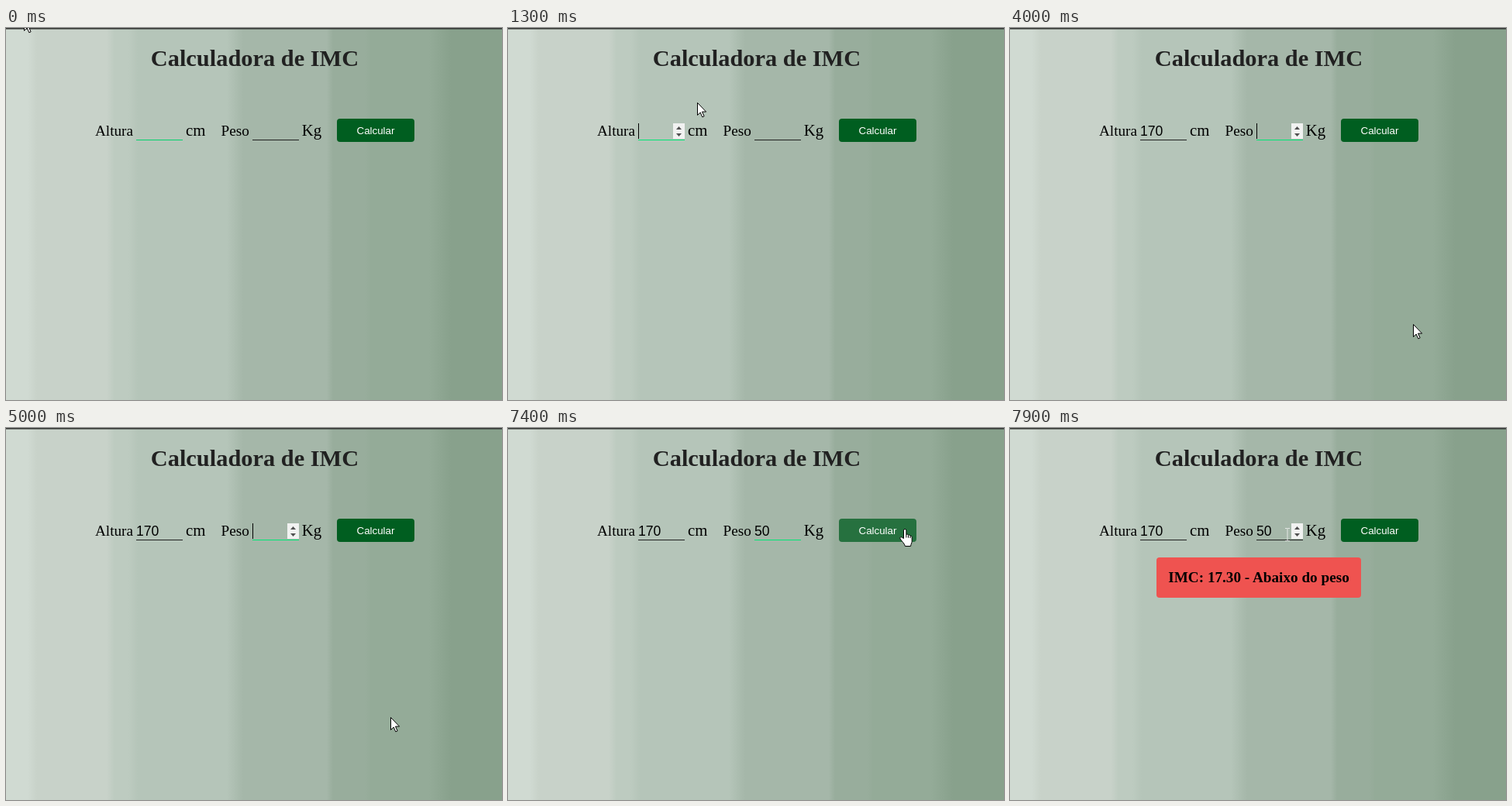
Animation of 640x480 px, one loop 8000 ms. Source, as an HTML page:

```html
<!DOCTYPE html>
<html lang="pt">
<head>
<meta charset="utf-8">
<title>Calculadora de IMC</title>
<style>
  html, body { margin: 0; width: 100%; height: 100%; overflow: hidden; }
  body {
    background: linear-gradient(90deg,
      #d0dad2 28px, #c8d2c9 40px 130px, #bdcbc0 140px 158px,
      #b5c5b9 170px 285px, #a5b7a9 306px 414px, #98ad9c 422px 464px,
      #94ab98 471px 546px, #88a18c 574px);
  }
  svg { display: block; width: 640px; height: 480px; }
  text { font-family: "Liberation Serif", "Times New Roman", serif; font-size: 19.2px; }
  .title { font-size: 30.4px; font-weight: bold; fill: #212121; }
  .unit { font-size: 20.8px; }
  .value, .label { font-family: "Liberation Sans", Arial, sans-serif; }
  .value { font-size: 17.6px; }
  .label { font-size: 13.333px; fill: #fff; }
  .result { font-weight: bold; }
</style>
</head>
<body>
<svg viewBox="0 0 640 480">
  <defs>
    <g id="spinner">
      <path fill="#f1f2f1" d="M45 123h15v20h-15z"/>
      <path fill="#505050" d="M49 131l3.5-4 3.5 4zM49 136h7l-3.5 4z"/>
    </g>
  </defs>
  <path fill="#363836" d="M0 0h640v1H0z"/>
  <path fill="#363836" opacity=".6" d="M0 1h640v1H0z"/>

  <text class="title" x="321" y="49" text-anchor="middle">Calculadora de IMC</text>
  <text x="115" y="139">Altura</text>
  <text class="unit" x="232" y="139">cm</text>
  <text x="277.5" y="139">Peso</text>
  <text class="unit" x="381.8" y="139">Kg</text>

  <g id="height" transform="translate(168 0)">
    <text class="value" y="139"></text>
    <rect class="line" y="144" width="60" height="1"/>
    <use class="spin" href="#spinner"/>
    <rect class="caret" y="123" width="1" height="20"/>
  </g>
  <g id="weight" transform="translate(318 0)">
    <text class="value" y="139"></text>
    <rect class="line" y="144" width="60" height="1"/>
    <use class="spin" href="#spinner"/>
    <rect class="caret" y="123" width="1" height="20"/>
  </g>

  <rect id="button" x="427" y="117" width="100" height="30" rx="4"/>
  <text class="label" x="477" y="137" text-anchor="middle">Calcular</text>

  <g id="result">
    <rect x="189" y="167" width="264" height="52" rx="4" fill="#ef5350"/>
    <text class="result" x="321" y="199" text-anchor="middle">IMC: 17.30 - Abaixo do peso</text>
  </g>

  <g id="pointer">
    <path id="arrow" fill="#fff" stroke="#000" d="M.5.5v16l3.7-3.5 2.6 5.9 2.3-1-2.6-5.8h5.1z"/>
    <g id="hand" transform="translate(-8 0)">
      <path fill="#fff" stroke="#000" d="M5.5 12.5V2.2a1.7 1.7 0 0 1 3.4 0V7.6c1-.8 2.5-.5 2.7.7 1.1-.6 2.3 0 2.4 1 1.1-.4 2.2.2 2.2 1.5v5.4c0 2.2-1.4 3.3-1.6 6.3H7.4C7 19.5 3 16 1 13c-1-1.7 1.1-3 2.5-1.7z"/>
      <path fill="none" stroke="#000" d="M8.9 7.5v4M11.5 8.5v3.2M14 9.5v2.5"/>
    </g>
    <path id="beam" fill="none" stroke="#e4e8e5" d="M-3 -7.5h2.5l.5.5.5-.5H3M0 -7.5v16M-3 8.5h2.5l.5-.5.5.5H3"/>
  </g>
</svg>
<script>
const LOOP = 8000, STEP = 100, FADE = 300, DIGIT = 9.79;
const DARK = [33, 33, 33], GREEN = [0, 230, 118];
const $ = id => document.getElementById(id);
const within = (t, spans) => spans.some(([a, b]) => t >= a && t < b);
const show = (el, on) => el.setAttribute('visibility', on ? 'visible' : 'hidden');

// Focus windows drive the underline fade; keys are [time, digit].
const fields = [
  { el: $('height'), focus: [[-2000, -60], [940, 2740]],
    keys: [[2100, '1'], [2300, '7'], [2500, '0']],
    spin: [[700, 2800]], caret: [[1000, 1600], [2100, 2800]] },
  { el: $('weight'), focus: [[2740, 7400]],
    keys: [[5800, '5'], [5900, '0']],
    spin: [[2800, 7400], [7900, 8000]],
    caret: [[2800, 3400], [3800, 4300], [4800, 5400], [5800, 6400], [6900, 7400]] }
];

// Pointer stops: time, x, y, shape
const moves = [
  [0, 23, -13, 'arrow'], [100, 36, 2, 'arrow'], [200, 62, 28, 'arrow'],
  [300, 95, 56, 'arrow'], [400, 130, 82, 'arrow'], [500, 160, 103, 'arrow'],
  [600, 182, 117, 'arrow'], [700, 196, 130, 'beam'], [800, 202, 134, 'beam'],
  [1100, 212, 128, 'beam'], [1200, 232, 108, 'arrow'], [1300, 244, 96, 'arrow'],
  [1500, 0, 0, ''], [2800, 196, 108, 'arrow'],
  [3600, 220, 128, 'arrow'], [3700, 295, 195, 'arrow'], [3800, 400, 290, 'arrow'],
  [3900, 490, 364, 'arrow'], [4000, 520, 382, 'arrow'], [4100, 512, 379, 'arrow'],
  [4200, 503, 375, 'arrow'], [4300, 499, 373, 'arrow'], [4500, 498, 373, 'arrow'],
  [4800, 497, 373, 'arrow'], [5000, 496, 373, 'arrow'], [5600, 495, 373, 'arrow'],
  [6200, 0, 0, ''], [6700, 297, 172, 'arrow'], [6800, 400, 168, 'arrow'],
  [6900, 500, 162, 'arrow'], [7000, 538, 152, 'arrow'],
  [7200, 523, 138, 'hand'], [7300, 515, 131, 'hand'], [7400, 513, 130, 'hand'],
  [7600, 360, 70, 'arrow'], [7700, 190, 31, 'arrow'], [7800, 134, 100, 'arrow'],
  [7900, 358, 137, 'beam']
];

function glow(t, spans) {
  const ramp = x => { x = Math.min(1, Math.max(0, x / FADE)); return x * x * (3 - 2 * x); };
  return spans.reduce((sum, [a, b]) => sum + ramp(t - a) - ramp(t - b), 0);
}

function drawField(f, t) {
  const part = name => f.el.querySelector('.' + name);
  const text = f.keys.filter(k => k[0] <= t).map(k => k[1]).join('');
  const k = glow(t, f.focus);
  part('value').textContent = text;
  part('line').setAttribute('fill',
    `rgb(${DARK.map((d, i) => Math.round(d + (GREEN[i] - d) * k))})`);
  part('caret').setAttribute('x', Math.floor(text.length * DIGIT));
  show(part('caret'), within(t, f.caret));
  show(part('spin'), within(t, f.spin));
}

function draw(now) {
  const t = Math.floor(now % LOOP / STEP) * STEP;
  fields.forEach(f => drawField(f, t));
  const [, x, y, shape] = moves.filter(m => m[0] <= t).pop();
  $('pointer').setAttribute('transform', `translate(${x} ${y})`);
  ['arrow', 'hand', 'beam'].forEach(s => show($(s), s === shape));
  $('button').setAttribute('fill', shape === 'hand' ? '#26713f' : '#005e20');
  show($('result'), t >= 7500);
}

let start;
function tick(now) {
  start ??= now;
  draw(now - start);
  requestAnimationFrame(tick);
}
draw(0);
requestAnimationFrame(tick);
</script>
</body>
</html>
```
